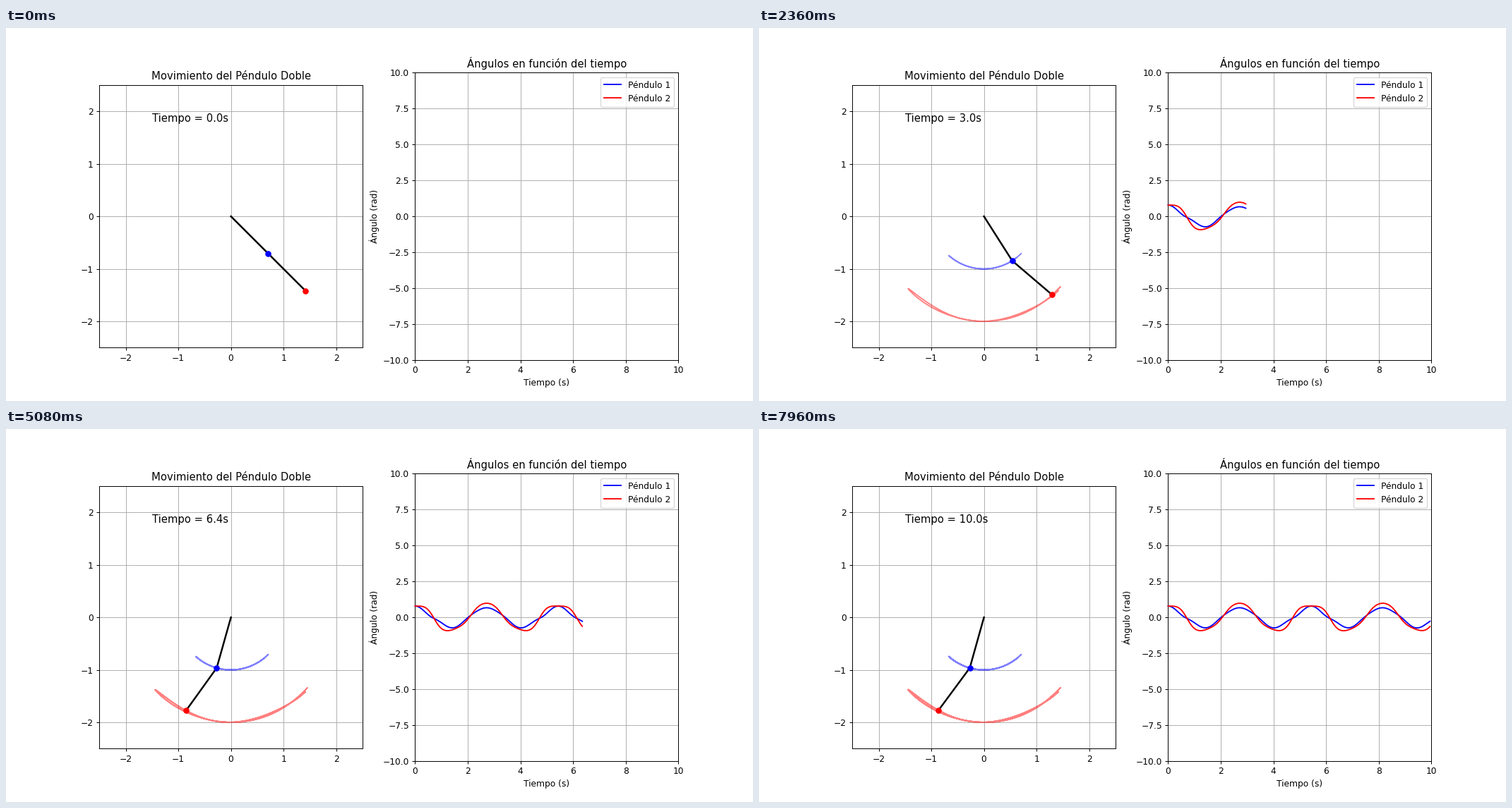
These frames come from a looping animation (1058 px wide and 529 px high, 8000 ms). A matplotlib script:

```python
import math
import numpy as np
import matplotlib.pyplot as plt
from matplotlib.animation import FuncAnimation
from matplotlib.lines import Line2D

G, L1, L2, M1, M2 = 9.81, 1.0, 1.0, 1.0, 1.0
DT, FRAMES, SUBSTEPS = 0.05, 200, 5


def deriv(s):
    a, va, b, vb = s.tolist()
    d = a - b
    sin, cos = math.sin(d), math.cos(d)
    den = 2 * M1 + M2 - M2 * math.cos(2 * d)
    acc_a = (-G * (2 * M1 + M2) * math.sin(a) - M2 * G * math.sin(a - 2 * b)
             - 2 * sin * M2 * (vb**2 * L2 + va**2 * L1 * cos)) / (L1 * den)
    acc_b = 2 * sin * (va**2 * L1 * (M1 + M2) + G * (M1 + M2) * math.cos(a)
                       + vb**2 * L2 * M2 * cos) / (L2 * den)
    return np.array([va, acc_a, vb, acc_b])


def rk4(s, h):
    k1 = deriv(s)
    k2 = deriv(s + h / 2 * k1)
    k3 = deriv(s + h / 2 * k2)
    k4 = deriv(s + h * k3)
    return s + h / 6 * (k1 + 2 * k2 + 2 * k3 + k4)


def solve():
    s = np.array([math.pi / 4, 0.0, math.pi / 4, 0.0])
    states = [s]
    for _ in range(FRAMES - 1):
        for _ in range(SUBSTEPS):
            s = rk4(s, DT / SUBSTEPS)
        states.append(s)
    return np.array(states)


t = np.arange(FRAMES) * DT
states = solve()
th1, th2 = states[:, 0], states[:, 2]
x1, y1 = L1 * np.sin(th1), -L1 * np.cos(th1)
x2, y2 = x1 + L2 * np.sin(th2), y1 - L2 * np.cos(th2)

plt.rcParams["font.family"] = "DejaVu Sans"
fig, (ax1, ax2) = plt.subplots(1, 2, figsize=(12, 6), dpi=1058 / 12)

ax1.set_xlim(-2.5, 2.5)
ax1.set_ylim(-2.5, 2.5)
ax1.set_aspect("equal")
ax1.grid()
ax1.set_title("Movimiento del Péndulo Doble")

ax2.set_xlim(0, 10)
ax2.set_ylim(-10, 10)
ax2.grid()
ax2.set_title("Ángulos en función del tiempo")
ax2.set_xlabel("Tiempo (s)")
ax2.set_ylabel("Ángulo (rad)")
ax2.plot([], [], "b-", label="Péndulo 1")
ax2.plot([], [], "r-", label="Péndulo 2")
ax2.legend(loc="upper right")

# Render the fixed axes once and keep them as a backdrop, for speed.
fig.canvas.draw()
backdrop = np.array(fig.canvas.buffer_rgba())
for ax in (ax1, ax2):
    ax.set_visible(False)
fig.figimage(backdrop, origin="upper")


def add_line(ax, color, **style):
    line = Line2D([], [], color=color, transform=ax.transData, **style)
    return fig.add_artist(line)


trail1 = add_line(ax1, "b", alpha=0.5)
trail2 = add_line(ax1, "r", alpha=0.5)
rod = add_line(ax1, "k", lw=2)
bob1 = add_line(ax1, "b", marker="o", ls="none")
bob2 = add_line(ax1, "r", marker="o", ls="none")
curve1 = add_line(ax2, "b")
curve2 = add_line(ax2, "r")
clock = fig.text(-1.5, 1.8, "", fontsize=12, transform=ax1.transData)


def update(i):
    n = i + 1
    rod.set_data([0, x1[i], x2[i]], [0, y1[i], y2[i]])
    bob1.set_data([x1[i]], [y1[i]])
    bob2.set_data([x2[i]], [y2[i]])
    trail1.set_data(x1[:n], y1[:n])
    trail2.set_data(x2[:n], y2[:n])
    curve1.set_data(t[:n], th1[:n])
    curve2.set_data(t[:n], th2[:n])
    clock.set_text(f"Tiempo = {t[i]:.1f}s")
    return trail1, trail2, rod, bob1, bob2, curve1, curve2, clock


anim = FuncAnimation(fig, update, frames=FRAMES, interval=40,
                     init_func=lambda: update(0), repeat=True, repeat_delay=0)
plt.show()
```
